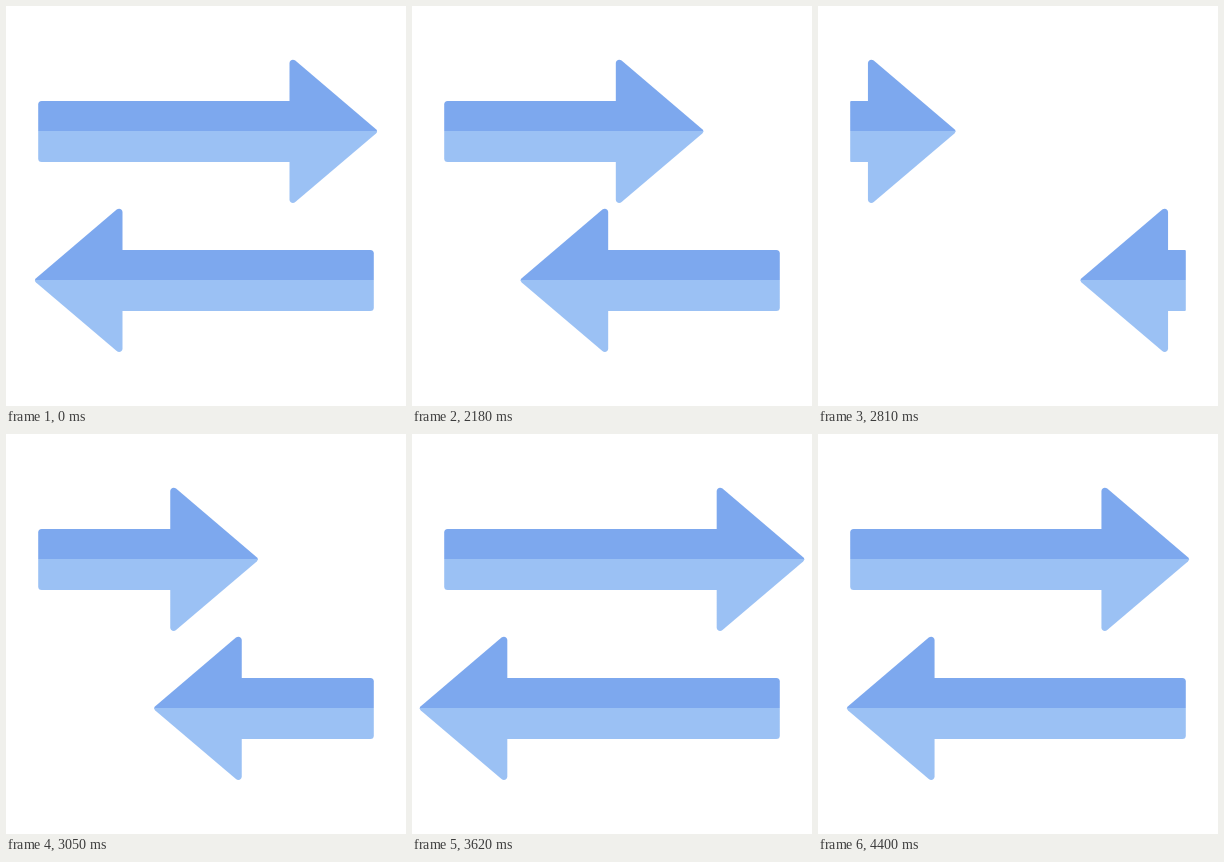
Recreate the animation shown at these times as an HTML page. Size 400 px wide and 400 px high, loop 4.43 s.

```html
<!DOCTYPE html>
<html lang="en">
<head>
<meta charset="utf-8">
<title>Transfer arrows</title>
<style>
  html, body { margin: 0; width: 100%; height: 100%; overflow: hidden; background: #fff; }
  svg { display: block; width: 100%; height: 100%; }
</style>
</head>
<body>
<svg viewBox="0 0 400 400">
  <defs>
    <linearGradient id="tone" gradientUnits="userSpaceOnUse" x1="0" y1="0" x2="0" y2="250.6">
      <stop offset=".5" stop-color="#7da8ee"/>
      <stop offset=".5" stop-color="#9bc1f4"/>
    </linearGradient>
    <g id="arrow" fill="url(#tone)">
      <rect id="tail" x="32.2" y="95" width="261" height="61" rx="3.5"/>
      <path id="head" d="M283.5 57C283.5 54 286.9 52.6 289.3 54.5L370 123.2Q372.2 125.3 370 127.4L289.3 196.1C286.9 198 283.5 196.6 283.5 193.6Z"/>
    </g>
  </defs>
  <use href="#arrow"/>
  <use href="#arrow" transform="translate(400 149) scale(-1 1)"/>
</svg>
<script>
  const LOOP = 4430, START = 2000, STEP = 30, REST = 371;
  const head = document.getElementById('head');
  const tail = document.getElementById('tail');

  // Tip position keys: end time in steps, tip x, easing handles x1 and x2.
  const keys = [
    { at: 0, x: REST },
    { at: 23.3, x: 120, x1: 0.333, x2: 0.22 },
    { at: 47.6, x: 399, x1: 0.333, x2: 0.667 },
    { at: 68, x: 359, x1: 0.46, x2: 0.65 },
    { at: 80.5, x: REST, x1: 0.333, x2: 0.667 }
  ];

  // cubic-bezier(x1, 0, x2, 1)
  function ease(u, x1, x2) {
    let lo = 0, hi = 1, s = u;
    for (let i = 0; i < 24; i++) {
      s = (lo + hi) / 2;
      const r = 1 - s;
      const x = 3 * x1 * s * r * r + 3 * x2 * s * s * r + s * s * s;
      if (x < u) lo = s; else hi = s;
    }
    return s * s * (3 - 2 * s);
  }

  function tipAt(n) {
    if (n <= 0) return REST;
    const i = keys.findIndex(k => n < k.at);
    if (i < 0) return REST;
    const a = keys[i - 1], b = keys[i];
    return a.x + (b.x - a.x) * ease((n - a.at) / (b.at - a.at), b.x1, b.x2);
  }

  function draw() {
    const t = performance.now() % LOOP;
    const shift = tipAt(Math.floor((t - START) / STEP)) - REST;
    const length = 251.3 + shift;
    head.setAttribute('transform', `translate(${shift.toFixed(2)} 0)`);
    tail.setAttribute('width', (length + 10).toFixed(2));
    tail.setAttribute('rx', Math.min(3.5, length / 18).toFixed(2));
    requestAnimationFrame(draw);
  }
  draw();
</script>
</body>
</html>
```
